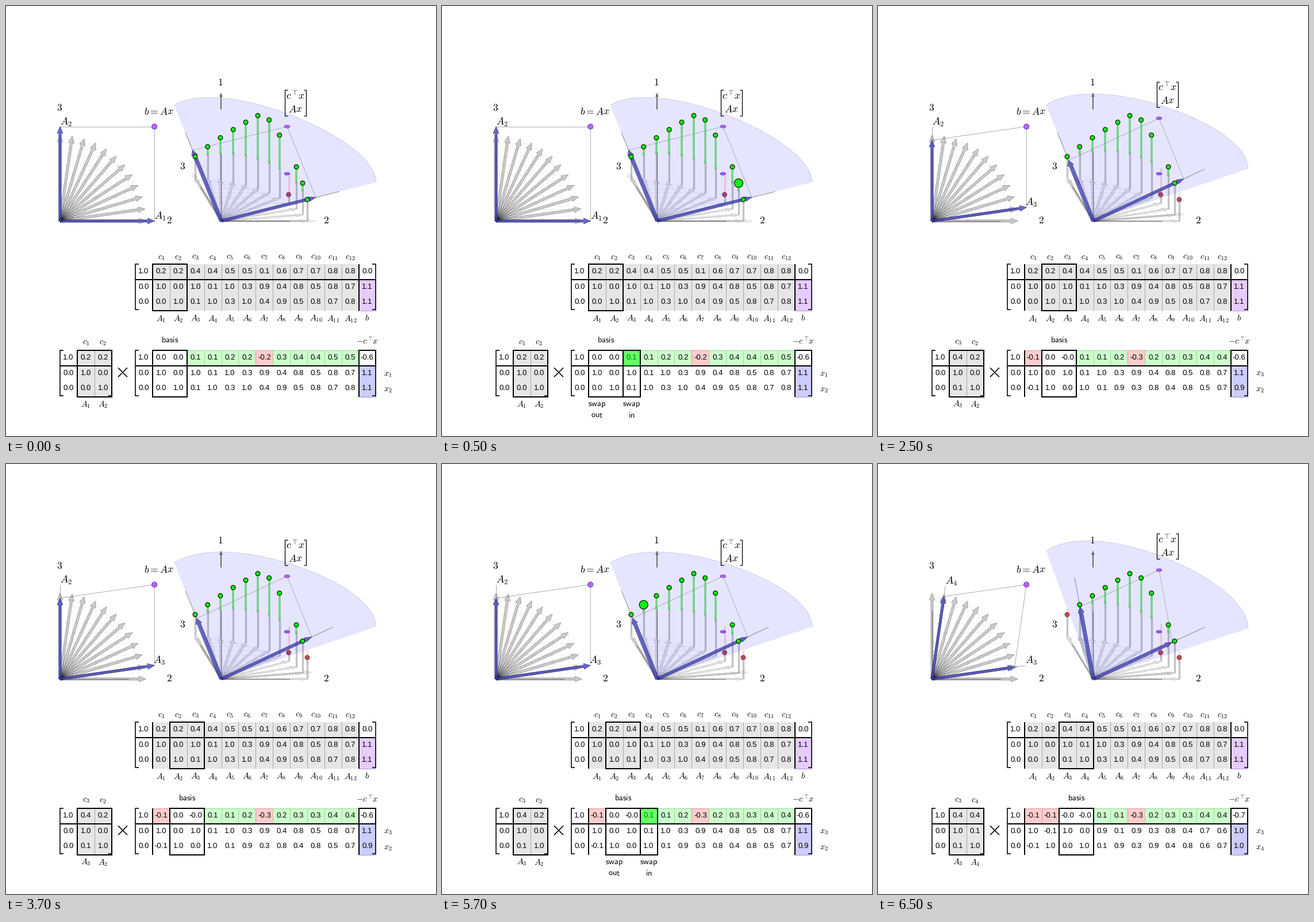
Write a matplotlib script that moves like this. It is 748x748 px and loops after 8000 ms.

```python
import matplotlib.pyplot as plt
import numpy as np
from matplotlib.animation import FuncAnimation
from matplotlib.patches import Ellipse, Polygon, Rectangle

plt.rcParams["mathtext.fontset"] = "cm"
plt.rcParams["text.hinting"] = "none"
SIZE, PT = 748, 0.72          # stage in pixels, points per pixel
UNIT = 149.3

# Linear program: twelve unit columns, interleaved from both axes
k = np.arange(12) // 2
step = np.pi / 22
angle = np.where(np.arange(12) % 2, np.pi / 2 - k * step, k * step)
A = np.array([np.cos(angle), np.sin(angle)]).round(12)
cost = 0.25 + 0.12 * k
cost[6] = 0.1
b = np.array([1.1, 1.1])

# basis, columns whose zero reduced cost prints with a sign
BASES = [([0, 1], ()), ([2, 1], (2,)), ([2, 3], (2, 3))]
# first tick, basis number, entering and leaving column
STEPS = [(0, 0, None, None), (1, 0, 2, 0), (5, 1, None, None),
         (9, 1, 3, 1), (13, 2, None, None)]

fig = plt.figure(figsize=(SIZE / 100, SIZE / 100), dpi=100, facecolor="white")
ax = fig.add_axes([0, 0, 1, 1])


# Lines and patches share one zorder, so they stack in drawing order
def line(points, color="black", width=1.0, **kw):
    xs, ys = zip(*points)
    kw.setdefault("solid_capstyle", "butt")
    ax.plot(xs, ys, color=color, lw=width * PT, zorder=2, **kw)


def polygon(points, fill, edge="none", width=1.0):
    ax.add_patch(Polygon(points, fc=fill, ec=edge, lw=width * PT, zorder=2))


def rect(x0, y0, x1, y1, fill="none", edge="none", width=1.0, zorder=2):
    ax.add_patch(Rectangle((x0, y0), x1 - x0, y1 - y0, fc=fill, ec=edge,
                           lw=width * PT, joinstyle="miter", zorder=zorder))


def disc(x, y, w, h, fill, edge, width=1.0):
    ax.add_patch(Ellipse((x, y), w, h, fc=fill, ec=edge, lw=width * PT,
                         zorder=2))


def bracket(x, top, bottom, side, width=1.6):
    line([(x + side, top), (x, top), (x, bottom), (x + side, bottom)],
         width=width, solid_joinstyle="miter")


def label(x, y, tex, size=14.6):
    ax.text(x, y, f"${tex}$", fontsize=size * PT, ha="center", va="center")


def word(x, y, text):
    label(x, y, rf"\mathsf{{{text}}}", 14.3)


def number(x, y, text):
    ax.text(x, y, text, fontsize=13.3 * PT, family="Liberation Sans",
            ha="center", va="center")


# Projections from the plane of the columns to pixels
def flat(p):
    return 94 + UNIT * p[0], 374 - UNIT * p[1]


def space(p, height=0.0):
    return (374.5 + 149.5 * p[0] - 45.5 * p[1],
            374 - 74.7 * p[1] - UNIT * height)


def arrow(vec, proj, fill, edge, half=0.014, width=0.6):
    length = np.hypot(*vec)
    d = np.array(vec) / length
    n = np.array([-d[1], d[0]])
    neck = length - 0.078
    shape = [(0, half), (neck, half), (neck, 0.034), (length, 0),
             (neck, -0.034), (neck, -half), (0, -half)]
    polygon([proj(s * d + t * n) for s, t in shape], fill, edge, width)


def grid(proj, color):
    for u, v in A.T:
        line([proj((0, v)), proj((u, v)), proj((u, 0))], color, 0.6)


def axes_lines(proj):
    for end in ((0.8, 0), (0, 0.8)):
        line([proj((0, 0)), proj(end)], (0, 0, 0, 0.65), 0.7)


BLUE, NAVY = (0.24, 0.24, 0.72, 0.74), (0.06, 0.06, 0.36, 0.8)
PURPLE, VIOLET = "#b266ff", "#7d3fc4"


def draw_flat(basis, x):
    grid(flat, "0.91")
    axes_lines(flat)
    for j in range(12):
        arrow(A[:, j], flat, (0, 0, 0, 0.2), (0, 0, 0, 0.42))
    for j, amount in zip(basis, x):
        tip = flat(1.1 * A[:, j])
        line([flat((0, 0)), tip], "0.5", 0.7)
        arrow(amount * A[:, j], flat, BLUE, NAVY)
        label(tip[0] + 10, tip[1] - 8.5, f"A_{j + 1}", 17.8)
    ends = [flat(amount * A[:, j]) for j, amount in zip(basis, x)]
    line([ends[0], flat(b), ends[1]], "0.3", 0.8, ls=(0, (1.6, 1.2)))
    disc(*flat(b), 9.2, 9.2, PURPLE, VIOLET)
    label(93, 178, "3", 17.5)
    label(284, 373, "2", 17.5)
    label(266, 184, "b = Ax", 17.6)


def draw_space(basis, x, price, entering):
    def lifted(p):
        return space(p, price @ np.array(p))

    grid(space, "0.91")
    axes_lines(space)
    line([space((0, 0)), space((0, 0), 0.8)], (0, 0, 0, 0.6), 0.8)
    for j in range(12):
        arrow(A[:, j], space, (0, 0, 0, 0.1), (0, 0, 0, 0.22))
    for j, amount in zip(basis, x):
        arrow(amount * A[:, j], space, (0, 0, 0, 0.05), (0, 0, 0, 0.2))

    plane = price @ A
    for j in range(12):
        foot = space(A[:, j])
        top = space(A[:, j], min(cost[j], plane[j] + 1e-9))
        line([foot, top], (0, 0, 0, 0.23), 3.4)
        if cost[j] < plane[j] - 1e-6:
            line([top, lifted(A[:, j])], (1, 0.3, 0.3, 0.22), 3.2)
            disc(*top, 7.8, 7.8, "#c2495a", "#7d3038", 0.9)
    disc(*space(b), 9.4, 4.4, PURPLE, VIOLET)

    # Cone of the price plane, closed by one cubic curve
    t = np.linspace(0, 1, 60)
    knots = np.array([(0, 1.8), (0.66, 2.044), (2.0, 0.6), (1.8, 0)])
    weights = np.array([(1 - t) ** 3, 3 * t * (1 - t) ** 2,
                        3 * t ** 2 * (1 - t), t ** 3])
    rim = [lifted(p) for p in weights.T @ knots]
    polygon([lifted((0, 0))] + rim, (0, 0, 1, 0.1))
    line(rim, (0.3, 0.3, 0.5, 0.25), 0.8)

    for j, amount in zip(basis, x):
        line([lifted((0, 0)), lifted(1.37 * A[:, j])], "0.5", 0.9)
        arrow(amount * A[:, j], lifted, BLUE, NAVY, 0.02)
    ends = [lifted(amount * A[:, j]) for j, amount in zip(basis, x)]
    line([ends[0], lifted(b), ends[1]], (0.3, 0.3, 0.35, 0.8), 0.8,
         ls=(0, (1.6, 1.2)))

    for j in range(12):
        if cost[j] < plane[j] - 1e-6:
            continue
        dot = space(A[:, j], cost[j])
        if j not in basis:
            low = lifted(A[:, j])
            line([low, dot], (0.2, 0.8, 0.25, 0.65), 3.6)
            disc(*low, 3.4, 3.4, "#7fdc8c", "#4fae60", 0.7)
        size = 15 if j == entering else 7.8
        disc(*dot, size, size, "#0df20d", "black", 1.1)

    bx, by = lifted(b)
    disc(bx, by, 9.4, 4.8, PURPLE, VIOLET)
    line([(374, 180), (374, 157)], "0.42", 2)
    polygon([(374, 150.5), (376.9, 158), (371.1, 158)], "0.42")
    label(372.5, 133.5, "1", 17.5)
    label(556.5, 373, "2", 17.5)
    label(307, 280, "3", 17.5)
    mid = by - 41
    bracket(485.3, mid - 22.5, mid + 22, 4.5, 1.3)
    bracket(522.3, mid - 22.5, mid + 22, -4.5, 1.3)
    label(503.5, mid - 13, r"c^{\top}\!x", 17.8)
    label(503.5, mid + 11, "Ax", 17.8)


CELL, LEFT, RIGHT = 29.9, 255, 613.8


def column(j):
    return LEFT + CELL * j


def numbers(x, top, values):
    for value, dy in zip(values, (12.5, 39.5, 66)):
        number(x, top + dy, value)


def text_of(values):
    return [f"{v:.1f}" for v in values]


def frame_lines(x0, bars, x1, top):
    line([(x0, top + 27.3), (x1, top + 27.3)], width=2)
    for x in bars:
        line([(x, top), (x, top + 81)], width=2)
    bracket(x0, top, top + 79, 6)
    bracket(x1, top, top + 79, -6)


def grey_cells(x0, count, top):
    rect(x0, top, x0 + CELL * count, top + 81, "0.9")
    for i in range(1, count):
        x = x0 + CELL * i
        line([(x, top), (x, top + 81)], "0.65", 1)


def right_side(top, fill, edge, values):
    rect(RIGHT, top + 27.3, 643.2, top + 81, fill, edge)
    numbers(628.3, top, values)


def basis_box(first, top):
    rect(column(first), top, column(first + 2), top + 81, edge="black", width=2)


def draw_problem(first):
    top = 449
    grey_cells(LEFT, 12, top)
    right_side(top, "#e5ccff", "#b78fd8", text_of([0, *b]))
    numbers(239.5, top, text_of([1, 0, 0]))
    for j in range(12):
        x = column(j) + CELL / 2
        numbers(x, top, text_of([cost[j], *A[:, j]]))
        label(x, 436.3, f"c_{{{j + 1}}}")
        label(x, 543.3, f"A_{{{j + 1}}}")
    label(628.3, 543, "b")
    frame_lines(225, (LEFT, RIGHT), 643, top)
    basis_box(first, top)


def draw_factor(basis):
    top = 599
    grey_cells(124, 2, top)
    numbers(108.7, top, text_of([1, 0, 0]))
    for i, j in enumerate(basis):
        x = 139 + CELL * i
        numbers(x, top, text_of([cost[j], *A[:, j]]))
        label(x, 584.5, f"c_{j + 1}")
        label(x, 692.5, f"A_{j + 1}")
    frame_lines(94, (124,), 183.8, top)
    rect(124, top, 183.8, top + 81, edge="black", width=2)
    for s in (-1, 1):
        line([(195, 637.3 - 8 * s), (211, 637.3 + 8 * s)], width=1.6)


def draw_tableau(basis, signed, x, price, entering, leaving):
    top = 599
    first = min(basis)
    reduced = cost - price @ A
    coords = np.linalg.solve(A[:, basis], A)
    numbers(239.5, top, text_of([1, 0, 0]))
    right_side(top, "#ccccff", "#9c9cd8", text_of([-(cost[basis] @ x), *x]))
    for j in range(12):
        if j in basis:
            values = ["-0.0" if j in signed else "0.0"]
            values += ["1.0" if j == i else "0.0" for i in basis]
        else:
            values = text_of([reduced[j], *coords[:, j]])
            fill, edge = (("#ccffcc", "#99d699") if reduced[j] > 0
                          else ("#ffcccc", "#e09a9a"))
            rect(column(j), top, column(j + 1), top + 27.3, fill, edge)
        numbers(column(j) + CELL / 2, top, values)
    frame_lines(225, (LEFT, RIGHT), 643, top)
    basis_box(first, top)
    rect(RIGHT, top, 643, top + 27.3, edge="black", width=2)
    word(column(first + 1), 582, "basis")
    label(628, 583, r"-c^{\top}\!x")
    for j, y in zip(basis, (640, 667)):
        label(664.5, y, f"x_{j + 1}")
    if entering is not None:
        # the highlight tints the number as well
        rect(column(entering), top, column(entering + 1), top + 27.3,
             (0, 1, 0, 0.5), zorder=4)
        rect(column(entering), top, column(entering + 1), top + 81,
             edge="black", width=2, zorder=5)
        for j, way in ((leaving, "out"), (entering, "in")):
            word(column(j) + CELL / 2, 694, "swap")
            word(column(j) + CELL / 2, 712.3, way)


def draw(tick):
    ax.clear()
    ax.set(xlim=(0, SIZE), ylim=(SIZE, 0))
    ax.axis("off")
    _, state, entering, leaving = [s for s in STEPS if s[0] <= tick][-1]
    basis, signed = BASES[state]
    x = np.linalg.solve(A[:, basis], b)
    price = np.linalg.solve(A[:, basis].T, cost[basis])
    draw_flat(basis, x)
    draw_space(basis, x, price, entering)
    draw_problem(min(basis))
    draw_factor(basis)
    draw_tableau(basis, signed, x, price, entering, leaving)
    return []


animation = FuncAnimation(fig, draw, frames=16, interval=500, repeat=True,
                          repeat_delay=0, init_func=lambda: [])
plt.show()
```
